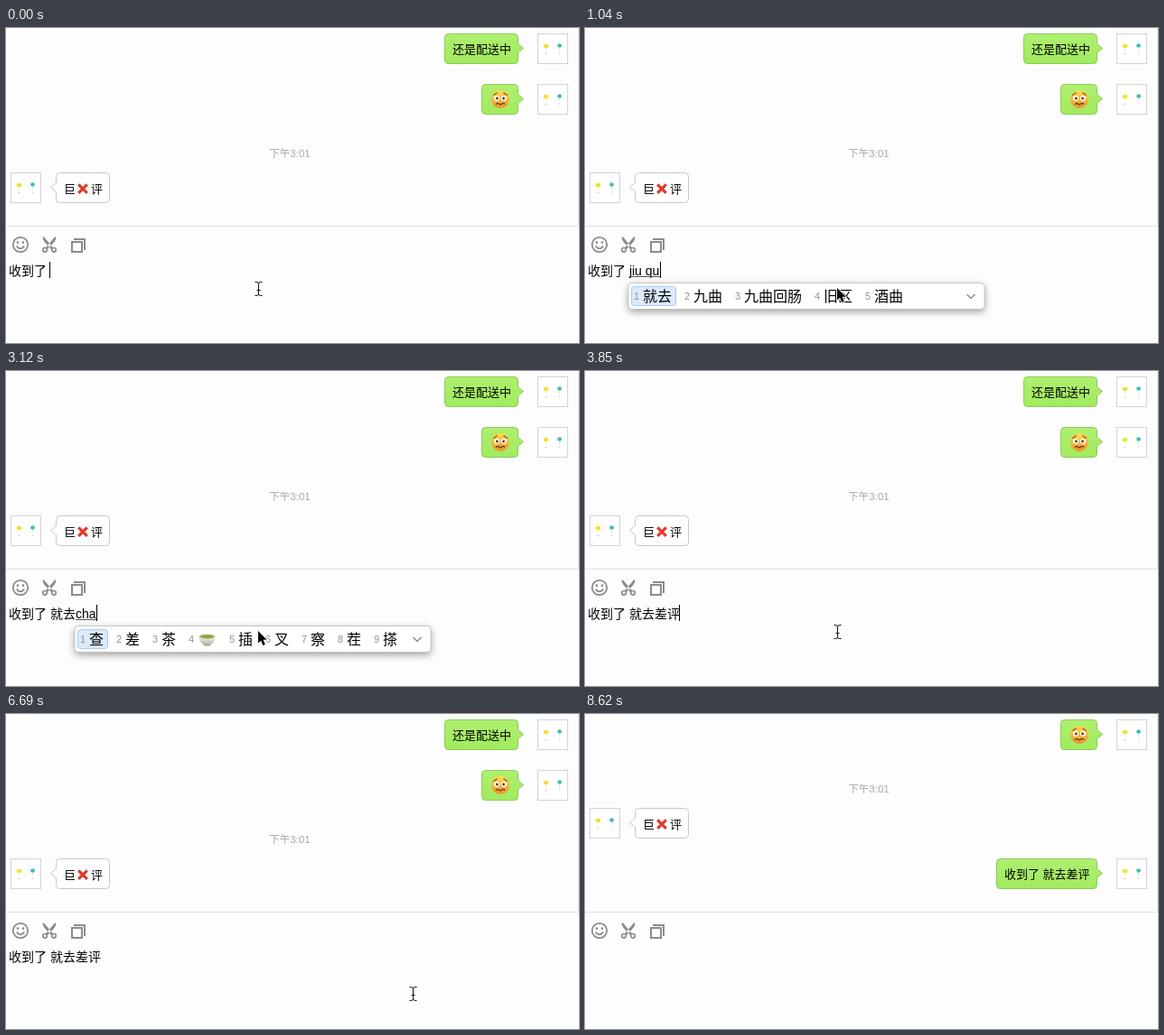
These frames come from a looping animation (634x349 px, 8.91 s). An HTML page with a canvas:

```html
<!DOCTYPE html>
<html lang="zh-CN">
<head>
<meta charset="utf-8">
<title>聊天输入</title>
<style>
html, body { margin: 0; width: 100%; height: 100%; overflow: hidden; background: #fdfdfd; }
canvas { display: block; width: 634px; height: 349px; }
</style>
</head>
<body>
<canvas id="stage"></canvas>
<script>
const W = 634, H = 349, LOOP = 8910, SENT = 7140, ROW = 56;
const FONT = '"Liberation Sans", "Noto Sans CJK SC", "Noto Sans CJK", sans-serif';
const canvas = document.getElementById('stage');
const ctx = canvas.getContext('2d');
const dpr = window.devicePixelRatio || 1;
canvas.width = Math.round(W * dpr);
canvas.height = Math.round(H * dpr);

// [start, committed text, pinyin being composed, candidates]
const DRAFTS = [
  [0, '收到了 ', '', ''],
  [600, '收到了 ', 'j', '就 及 将 级 今 加 叫'],
  [750, '收到了 ', 'ji', '及 级 几 机 记 即 季'],
  [890, '收到了 ', 'jiu', '就 九 旧 酒 久 救 究'],
  [1040, '收到了 ', 'jiu qu', '就去 九曲 九曲回肠 旧区 酒曲'],
  [1490, '收到了 就去', '', ''],
  [1940, '收到了 就去', 'ch', '成 吃 丑 穿好 租 出 车 @car'],
  [2080, '收到了 就去', 'cha', '查 差 茶 @tea 插 叉 察 茬 搽'],
  [3260, '收到了 就去', 'cha p', '差评 产品 插拔 茶盘 插片 查'],
  [3710, '收到了 就去差评', '', ''],
  [SENT, '', '', '']
];

const CARET_OFF = [[2530, 3120], [4450, 5040], [5640, 6090], [6690, 7140], [7580, 8180], [8620, LOOP]];

// [start, shape, x, y]
const POINTER = [
  [0, beam, 279, 289], [600, arrow, 279, 288], [1490, beam, 279, 289],
  [1940, arrow, 279, 288], [3850, beam, 279, 289], [4450, beam, 276, 300],
  [4600, beam, 268, 318], [4740, beam, 258, 340], [4890, null],
  [6090, arrow, 453, 304], [6240, beam, 450, 310], [7440, beam, 545, 341], [7580, null]
];

const at = (cues, t) => cues.filter(c => c[0] <= t).pop();

function text(str, x, y, size, color = '#000', align = 'left') {
  ctx.font = `${size}px ${FONT}`;
  ctx.textAlign = align;
  ctx.fillStyle = color;
  ctx.fillText(str, x, y);
  return ctx.measureText(str).width;
}

function line(points, color, width) {
  ctx.beginPath();
  points.forEach(([x, y]) => ctx.lineTo(x, y));
  ctx.strokeStyle = color;
  ctx.lineWidth = width;
  ctx.stroke();
}

function disc(x, y, rx, ry, color) {
  ctx.beginPath();
  ctx.ellipse(x, y, rx, ry, 0, 0, Math.PI * 2);
  ctx.fillStyle = color;
  ctx.fill();
}

function strokePath(d, color, width) {
  ctx.strokeStyle = color;
  ctx.lineWidth = width;
  ctx.stroke(new Path2D(d));
}

function fillPath(d, color) {
  ctx.fillStyle = color;
  ctx.fill(new Path2D(d));
}

function placed(x, y, draw) {
  ctx.save();
  ctx.translate(x, y);
  draw();
  ctx.restore();
}

function gradient(y0, y1, from, to) {
  const g = ctx.createLinearGradient(0, y0, 0, y1);
  g.addColorStop(0, from);
  g.addColorStop(1, to);
  return g;
}

function avatar(x, y) {
  placed(x, y, () => {
    ctx.fillStyle = '#fff';
    ctx.fillRect(0, 0, 34, 34);
    ctx.strokeStyle = '#d3d3d3';
    ctx.lineWidth = 1;
    ctx.strokeRect(0.5, 0.5, 33, 33);
    disc(9.5, 14, 2.9, 2.2, '#f0e238');
    disc(24.5, 13.5, 2.4, 2.2, '#43bdb5');
    line([[9.5, 16], [9.5, 19]], '#eeeab5', 0.8);
    line([[24.5, 16], [24.5, 19]], '#c5e5df', 0.8);
    disc(9.5, 22.5, 0.7, 0.7, '#b9b9a4');
    disc(24.5, 22, 0.7, 0.7, '#b5c9c4');
  });
}

function bubble(x0, x1, y, mine) {
  const l = x0 + 0.5, r = x1 - 0.5, t = y + 0.5, b = y + 33.5;
  ctx.beginPath();
  ctx.moveTo(l + 4, t);
  ctx.arcTo(r, t, r, b, 4);
  if (mine) {
    ctx.lineTo(r, y + 11.5);
    ctx.lineTo(r + 6, y + 16.5);
    ctx.lineTo(r, y + 21.5);
  }
  ctx.arcTo(r, b, l, b, 4);
  ctx.arcTo(l, b, l, t, 4);
  if (!mine) {
    ctx.lineTo(l, y + 21.5);
    ctx.lineTo(l - 6, y + 16.5);
    ctx.lineTo(l, y + 11.5);
  }
  ctx.arcTo(l, t, r, t, 4);
  ctx.closePath();
  ctx.fillStyle = mine ? gradient(t, b, '#afef70', '#a1ea5d') : '#fff';
  ctx.fill();
  ctx.strokeStyle = mine ? '#8acb5c' : '#c8c8c8';
  ctx.lineWidth = 1;
  ctx.stroke();
}

function face() {
  disc(0, 0, 10, 10, gradient(-10, 10, '#ffdc55', '#e8942c'));
  disc(-4, -1.2, 3.2, 3.1, '#fff8e6');
  disc(4, -1.2, 3.2, 3.1, '#fff8e6');
  disc(-3.6, -1, 1.3, 1.4, '#4b2b12');
  disc(3.6, -1, 1.3, 1.4, '#4b2b12');
  strokePath('M-8-4.5Q-5.5-5.5-3.5-7.5M8-4.5Q5.5-5.5 3.5-7.5', '#8f551c', 1.2);
  strokePath('M-5 6Q-3.3 3.5-1.7 5T1.7 5T5 5.5', '#6e3a13', 1.3);
}

function car() {
  fillPath('M1 5Q1 2 4 1L7-3Q8-5 11-5H15Q17-5 18-2L20 1Q21 2 20.5 5L19 6H2Z', '#d8352a');
  fillPath('M6 0L8.3-3.2H11V0ZM12 0V-3.2H15L17 0Z', '#a9d0e4');
  for (const x of [5.5, 16.2]) {
    disc(x, 5, 2.3, 2.3, '#333');
    disc(x, 5, 1.1, 1.1, '#bbb');
  }
  disc(2.3, 2.5, 0.9, 0.8, '#ffe08a');
}

function tea() {
  fillPath('M1-3Q2 4 7 6H14Q19 4 20-3Z', gradient(-3, 6, '#f4f3ee', '#b9b8ad'));
  fillPath('M6.5 5.5H14.5L14 7.5H7Z', '#a5a499');
  disc(10.5, -3, 9.5, 3, '#dcdcd2');
  disc(10.5, -2.7, 8, 2.1, '#8ba83e');
}

function messages(scroll) {
  ctx.save();
  ctx.beginPath();
  ctx.rect(0, 0, W, 219);
  ctx.clip();
  ctx.translate(0, -scroll);

  bubble(485, 567, 6, true);
  text('还是配送中', 494, 28, 13);
  avatar(588, 6);

  bubble(526, 567, 62, true);
  placed(547, 79, face);
  avatar(588, 62);

  text('下午3:01', 314, 143, 11.5, '#a9a9a9', 'center');

  avatar(5, 160);
  bubble(55, 115, 160, false);
  text('巨', 64, 183, 13);
  strokePath('M80.2 173.4L89.8 182.8M89.8 173.4L80.2 182.8', '#dc3b2a', 3.2);
  text('评', 94, 183, 13);

  if (scroll) {
    bubble(455, 567, 216, true);
    text('收到了 就去差评', 464, 238, 13);
    avatar(588, 216);
  }
  ctx.restore();
}

function toolbar() {
  const gray = '#8b8b8b';
  ctx.fillStyle = '#dfdfdf';
  ctx.fillRect(0, 219, W, 1);
  ctx.fillRect(633, 0, 1, 219);

  placed(16, 240, () => {
    strokePath('M8.2 0A8.2 8.2 0 1 1-8.2 0A8.2 8.2 0 1 1 8.2 0', gray, 1.8);
    disc(-3, -2.4, 1.2, 1.5, gray);
    disc(3, -2.4, 1.2, 1.5, gray);
    strokePath('M-4.3 1.6Q0 7 4.3 1.6', gray, 1.7);
  });
  placed(48, 240, () => {
    fillPath('M-7.5-8.5L-6-8.5L4 3.2L2 5L-5.5-3Q-7.5-5.5-7.5-8.5ZM7.5-8.5L6-8.5L-4 3.2L-2 5L5.5-3Q7.5-5.5 7.5-8.5Z', gray);
    for (const x of [-5, 5]) {
      ctx.beginPath();
      ctx.arc(x, 5.8, 2.3, 0, Math.PI * 2);
      ctx.strokeStyle = gray;
      ctx.lineWidth = 1.7;
      ctx.stroke();
    }
  });
  ctx.strokeStyle = gray;
  ctx.lineWidth = 2;
  ctx.strokeRect(73, 237, 11, 11);
  line([[75, 234], [87, 234], [87, 246]], gray, 2);
}

function panel(x, list) {
  ctx.save();
  ctx.shadowColor = 'rgba(0,0,0,.38)';
  ctx.shadowBlur = 9 * dpr;
  ctx.shadowOffsetY = 3 * dpr;
  ctx.beginPath();
  ctx.roundRect(x, 282.5, 394, 29, 4);
  ctx.fillStyle = '#fff';
  ctx.fill();
  ctx.restore();
  ctx.strokeStyle = '#bdbdbd';
  ctx.lineWidth = 0.8;
  ctx.stroke();

  const pictures = { '@car': car, '@tea': tea };
  let left = x + 6;
  list.split(' ').forEach((word, i) => {
    const picture = pictures[word];
    const width = picture ? 21 : word.length * 16;
    if (i === 0) {
      ctx.beginPath();
      ctx.roundRect(x + 3.5, 286.5, width + 17, 21, 3);
      ctx.fillStyle = '#dceafc';
      ctx.fill();
      ctx.strokeStyle = '#a9caf3';
      ctx.lineWidth = 1;
      ctx.stroke();
    }
    text(i + 1, left, 301, 11, '#929292');
    if (picture) placed(left + 10, 297, picture);
    else text(word, left + 10, 302.5, 16);
    left += width + 24;
  });
  line([[x + 374.5, 295], [x + 379, 299.5], [x + 383.5, 295]], '#8c8c8c', 1.4);
}

function arrow() {
  const d = 'M0 0V13.5L3.1 10.7L5.3 16L7.8 15L5.6 9.8H9.6Z';
  ctx.lineJoin = 'round';
  strokePath(d, '#fff', 1.8);
  fillPath(d, '#000');
  ctx.lineJoin = 'miter';
}

function beam() {
  const d = 'M-3.5-7.5H-1.8Q0.5-7.5 0.5-5.5Q0.5-7.5 2.8-7.5H4.5M0.5-5.5V5.5M-3.5 7.5H-1.8Q0.5 7.5 0.5 5.5Q0.5 7.5 2.8 7.5H4.5M-1.5 1.5H2.5';
  strokePath(d, 'rgba(255,255,255,.8)', 2.4);
  strokePath(d, '#111', 1);
}

function input(t) {
  const [, done, pinyin, list] = at(DRAFTS, t);
  let end = 3 + text(done, 3, 274, 14);
  const start = end;
  if (pinyin) {
    end += text(pinyin, start, 274, 14) + 1;
    ctx.fillStyle = '#555';
    ctx.fillRect(Math.round(start), 275, Math.floor(end) - Math.round(start), 1);
  }
  if (!CARET_OFF.some(([a, b]) => t >= a && t < b)) {
    ctx.fillStyle = '#000';
    ctx.fillRect(Math.floor(end), 259, 1, 18);
  }
  if (list) panel(Math.round(start) - 1, list);
}

function draw(t) {
  ctx.setTransform(dpr, 0, 0, dpr, 0, 0);
  ctx.fillStyle = '#fdfdfd';
  ctx.fillRect(0, 0, W, H);
  messages(t >= SENT ? ROW : 0);
  toolbar();
  input(t);
  const [, shape, x, y] = at(POINTER, t);
  if (shape) placed(x, y, shape);
}

const begin = performance.now();
function tick() {
  draw((performance.now() - begin) % LOOP);
  requestAnimationFrame(tick);
}
tick();
</script>
</body>
</html>
```
